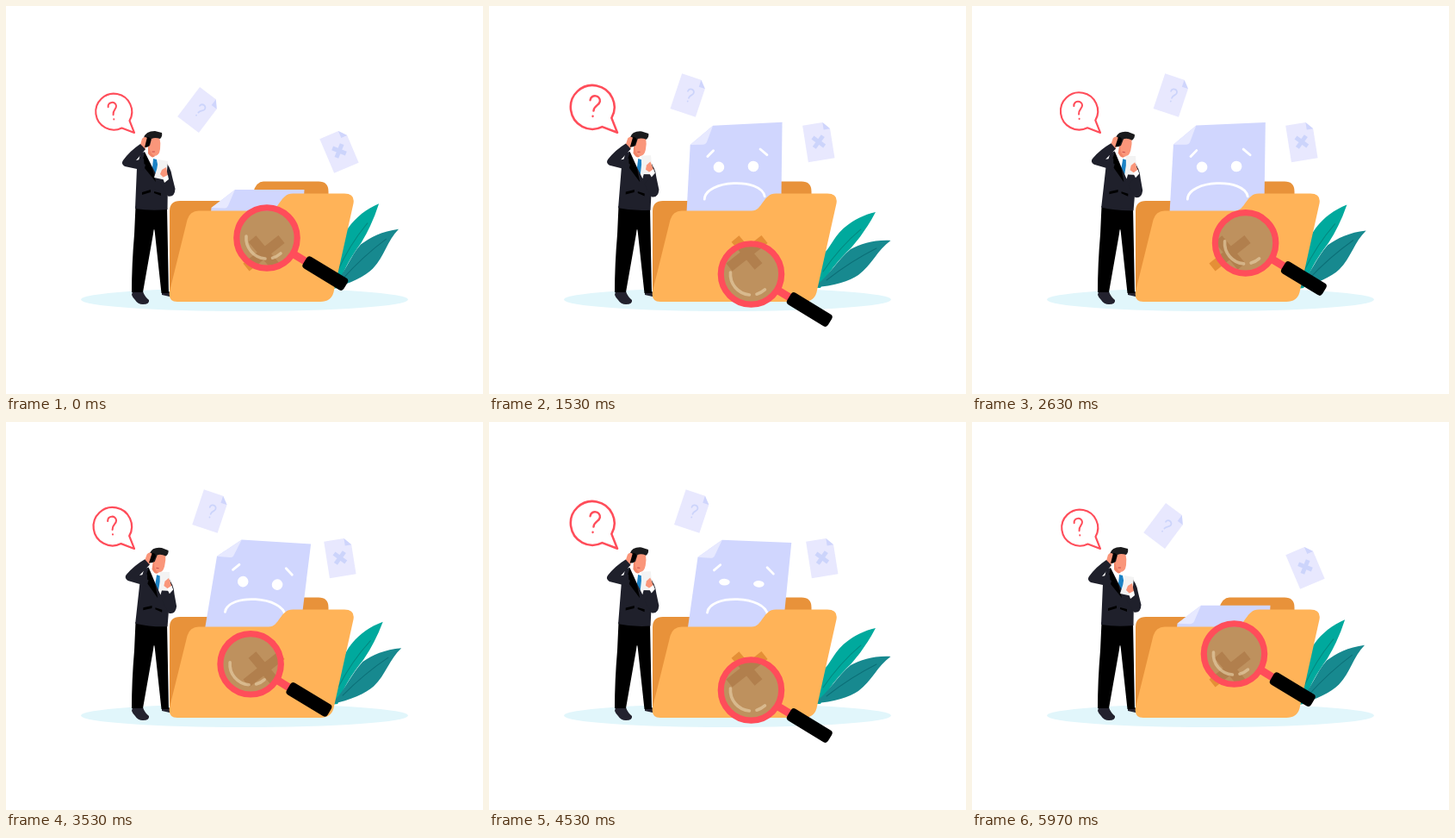
An HTML page for the animation above (6.01 s loop, 554 px wide and 450 px high).

```html
<!DOCTYPE html>
<html lang="en">
<head>
<meta charset="utf-8">
<title>File search</title>
<style>
  html, body { margin: 0; width: 100%; height: 100%; overflow: hidden; background: #fff; }
  svg { display: block; width: 554px; height: 450px; }
  .line { fill: none; stroke-linecap: round; stroke-linejoin: round; }
</style>
</head>
<body>
<svg viewBox="0 0 554 450">
  <defs>
    <g id="sheet">
      <path fill="#e8e8fe" d="M-15.5-21.5H8L15.5-13V21.5H-15.5Z"/>
      <path fill="#cfd5fc" d="M8-21.5 15.5-13H8Z"/>
    </g>
    <path id="ask" class="line" d="M-4.6-5.5C-4.6-12 5-11.5 4.8-5.5C4.6-1.5-.2-1.2 0 4.2M0 9.3V9.5"/>
  </defs>

  <ellipse cx="277" cy="340.5" rx="190" ry="13.5" fill="#e1f6fb"/>

  <g id="leaves">
    <path fill="#00a99d" d="M449 239C427 244 409 257 400 272Q389 290 376 300V327H385Q395 305 421 280Q437 262 449 239Z"/>
    <path fill="#17898f" d="M466.500 272C447 271 432 276 420 282C405 294 396 312 378 326C400 325 419 319 429 312C445 300 451 283 466.500 272Z"/>
    <path class="line" stroke="#04877f" d="M432 259Q408 279 388 308"/>
    <path class="line" stroke="#0b6f77" d="M450 281Q420 296 392 318"/>
  </g>

  <g id="man">
    <path fill="#23222e" d="M147 331H159Q161 337 166 341Q167 346 159 346Q153 346 150 341Q147 338 146 335Z"/>
    <path fill="#23222e" d="M181 331H189L196 336Q195 338 190 337L181 335Z"/>
    <path d="M150.500 232H187L189 333H180.500L173 264Q172 254 171 264L159 332H146Q146 300 149 265Z"/>
    <g id="body">
      <path fill="#fff" d="M160 169 166 167 174 174 183 179 177 204 165 190Z"/>
      <path fill="#1b82c5" d="M171 177 175 178 177 189 174 196 170 188Z"/>
      <path fill="#1f202b" d="M156 171 161 169 170 187 177 200 181 181 187 182Q190 190 188 200L187.500 236Q168 238 150 235L152 188Z"/>
      <path d="M161 170 158 182 162 184 161 188 174 204 170 188ZM158 216 168 213V216L158 219ZM172 215 180 217V220L172 217Z"/>
      <g id="head">
        <path fill="#f08467" d="M165 161H173V174Q170 178 165 171Z"/>
        <path fill="#fa967a" d="M166 151H178Q180 159 179 166Q178 174 172 174Q167 171 166 161Z"/>
        <path fill="#1b1b1d" d="M160 153Q162 145 173 145L181 147Q182 151 179 154Q173 152 169 154L167 162 163 164Z"/>
        <path class="line" stroke="#c94d4c" d="M170 169 172.500 169"/>
      </g>
      <path fill="#fa967a" d="M156 161 158 154Q161 150 165 154L163 163 161 167Z"/>
      <path d="M164 152Q169 152 168 157L165 163 161 164Z"/>
      <path fill="#1f202b" d="M156 160 162 166 158 171 151 179 160 177 161 191 152 189 138 186Q133 183 136 179Q144 168 156 160Z"/>
      <path fill="#1f202b" d="M184 181Q191 185 193 198L196.500 212Q196 222 188 220.500L179 206 186 199Z"/>
      <g id="note">
        <path fill="#f3f3f3" d="M177 178 188 180 186 202 172 199Q176 189 177 178Z"/>
        <path fill="#fa967a" d="M181 190 186 187 188 197 184 200 179 195Z"/>
        <path fill="#fff" d="M182 199 188 196 189 201 184 205Z"/>
      </g>
    </g>
  </g>

  <path fill="#e8923a" d="M190 238Q190 226 202 226H275Q284 226 287 216Q291 203.500 299 203.500H363Q374.500 203.500 374.500 215V330H190Z"/>

  <g id="paper">
    <path fill="#d0d6fe" d="M238.500 158.500 266 137.500H346.500L339 262H228Z"/>
    <path fill="#e7e9ff" d="M238.500 158.500 266 137.500 258 156Q257 159 253 159Z"/>
    <g class="line" stroke="#fff" stroke-width="2.800">
      <path d="M258 173 265 166.500M319.500 167.500 327 174.500"/>
      <path d="M252 222.500C254 200 319 200 322 222.500"/>
    </g>
    <g id="eyes" fill="#fff"><circle cx="270.500" cy="186" r="6.300"/><circle cx="310.500" cy="187" r="6.300"/></g>
  </g>

  <path fill="#ffb358" d="M224 237.500H305C318 237.500 318 217.500 333 217.500H393Q405.500 217.500 403.500 229L380.500 332Q377.500 343 365 343H199Q188 343 190 331L210.500 248Q213.500 237.500 224 237.500Z"/>
  <path fill="none" stroke="#e58f36" stroke-width="11.500" d="M279 303 320 270.500M286 270 313 302"/>

  <g id="glass">
    <circle r="35" fill="#7f7064" fill-opacity=".5"/>
    <g class="line" stroke="#ead3ae" stroke-opacity=".6" stroke-width="3.600">
      <path d="M-24-2A24 24 0 0 0-2 24"/>
      <path d="M6.500 23.200A24 24 0 0 0 16 18"/>
    </g>
    <g transform="rotate(31.2)">
      <path stroke="#ff4d5a" stroke-width="9" d="M37 0H55"/>
      <rect x="51.500" y="-8" width="55.500" height="16" rx="4"/>
    </g>
    <circle r="35.200" fill="none" stroke="#ff4d5a" stroke-width="7.200"/>
  </g>

  <g id="askSheet">
    <use href="#sheet"/>
    <use href="#ask" stroke="#ccd4fb" stroke-width="2.400" transform="translate(1 0) scale(.75)"/>
  </g>
  <g id="crossSheet">
    <use href="#sheet"/>
    <path stroke="#ccd4fb" stroke-width="5" d="M-6-6 6 6M6-6-6 6"/>
  </g>

  <g id="bubble">
    <path fill="#fff" stroke="#ff4d5a" stroke-width="2.100" stroke-linejoin="round" d="M143.500 133 149 147 134.500 141.500A21 21 0 1 1 143.500 133Z"/>
    <use id="bubbleAsk" href="#ask" stroke="#ff4d5a" stroke-width="2"/>
  </g>
</svg>
<script>
const LOOP = 6010, FPS = 30, FRAMES = 180;
const $ = id => document.getElementById(id);
const set = (id, value) => $(id).setAttribute('transform', value);
const ease = x => { x = Math.min(1, Math.max(0, x)); return x * x * (3 - 2 * x); };
const mix = (a, b, k) => a + (b - a) * k;
const wave = (s, period) => (1 - Math.cos(2 * Math.PI * s / period)) / 2;
const rise = (s, length) => ease(s / length) * ease((6 - s) / length);
// swing left, then right, then back to the middle
const swing = s => -ease(s - 1) + 2 * ease((s - 2) / 2) - ease(s - 4);

function placeSheet(id, from, to, k, shift) {
  const [x, y, turn] = from.map((v, i) => mix(v, to[i], k));
  set(id, `translate(${x + shift} ${y}) rotate(${turn})`);
}

function draw(ms) {
  const s = Math.min(FRAMES - 1, Math.floor((ms + 4) * FPS / 1000)) / FPS;
  const fast = wave(s, 3), slow = wave(s, 6), sway = swing(s), up = rise(s, 1);

  const a = 2 * Math.PI * s / 3;
  set('glass', `translate(${303 - 21 * Math.sin(a)} ${290 - 21 * Math.cos(a)})`);
  set('leaves', `rotate(${10 * (fast - 1)} 385 325)`);

  const size = 1 + 0.21 * fast;
  set('bubble', `translate(149 148) scale(${size}) translate(-149 -148)`);
  set('bubbleAsk', `translate(${mix(124, 126.8, fast)} 122) rotate(${mix(-8, 8, fast)})`);

  set('paper', `translate(0 ${75.5 * (1 - rise(s, 0.9))}) rotate(${5 * sway} 287 260)`);
  const open = 1 - 0.9 * (1 - ease(Math.abs(s - 4.67) / 0.25));
  set('eyes', `translate(0 186.5) scale(1 ${open}) translate(0 -186.5)`);

  placeSheet('askSheet', [224.5, 120.5, 37], [234.5, 103.5, 18.5], up, 4.5 * sway);
  placeSheet('crossSheet', [387, 168, -23], [385, 157.5, -9], up, 4 * sway);

  const lift = Math.min(1, 3.5 * slow);
  set('body', `rotate(${4.2 * slow} 170 237)`);
  set('head', `rotate(${4 * slow} 168 172)`);
  set('note', `translate(0 ${-6 * lift}) rotate(${-13 * lift} 181 190)`);
}

const start = performance.now();
function tick(now) {
  draw(Math.max(0, now - start) % LOOP);
  requestAnimationFrame(tick);
}
draw(0);
requestAnimationFrame(tick);
</script>
</body>
</html>
```
